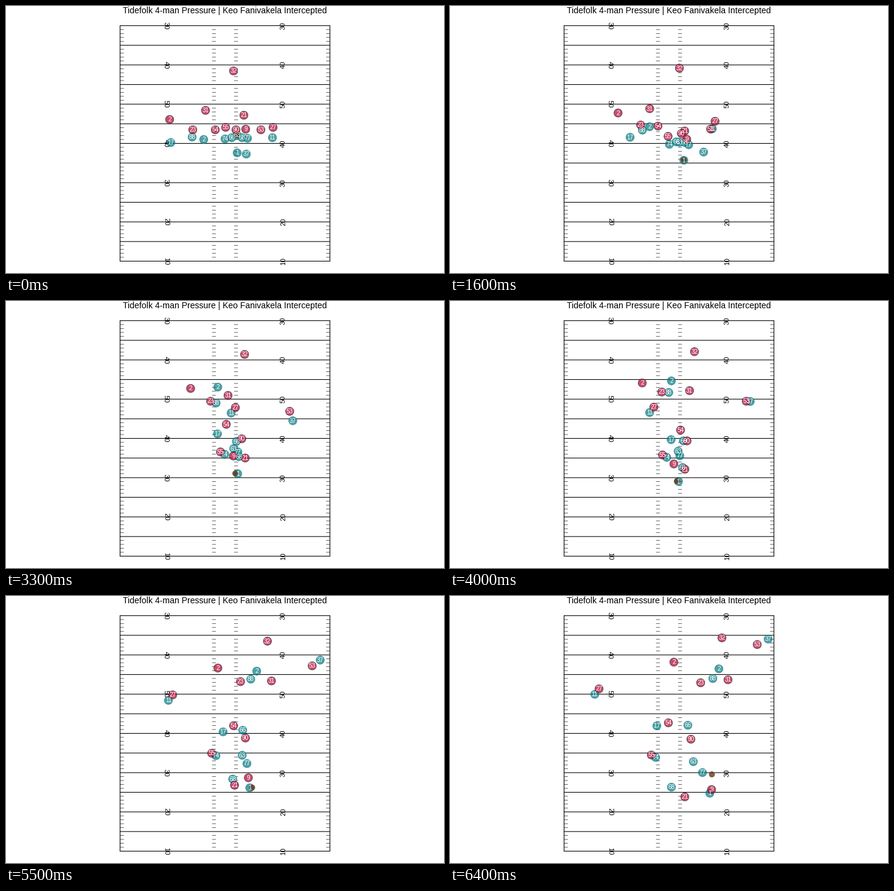
Write a matplotlib script that moves like this. It is 720 by 440 pixels and loops after 6.5 s.

```python
import numpy as np
import matplotlib.pyplot as plt
from matplotlib.animation import FuncAnimation
from matplotlib.patches import Circle

W, H, DPI = 720, 440, 100
FRAMES, STEP = 65, 100
PX = 72 / DPI                       # points per pixel
LEFT, RIGHT, TOP, BOTTOM = 187.5, 532.5, 32.4, 420.5
YARD = (BOTTOM - TOP) / 60
SNAP, CATCH, THROW, LAST = 5, 11, 60, FRAMES - 1
TIME = np.arange(FRAMES)

RED = dict(facecolor="#b80f34", edgecolor="#002244", alpha=0.75)
TEAL = dict(facecolor="#05787f", edgecolor="#05787f", alpha=0.7)
BROWN = dict(facecolor="#5f3014", edgecolor="#5f3014", alpha=0.76)

plt.rcParams["font.family"] = "Liberation Sans"
fig = plt.figure(figsize=(W / DPI, H / DPI), dpi=DPI, facecolor="white")
ax = fig.add_axes([0, 0, 1, 1])
ax.set_xlim(0, W)
ax.set_ylim(H, 0)
ax.axis("off")


def line(x0, y0, x1, y1, color="black", lw=1.07):
    ax.plot([x0, x1], [y0, y1], color=color, lw=lw * PX, snap=False,
            solid_capstyle="projecting" if lw > 1 else "butt", zorder=1)


def label(x, y, s, size, **kw):
    return ax.text(x, y, s, fontsize=size * PX, ha="center", va="baseline",
                   rotation_mode="anchor", **kw)


def draw_field():
    for yard in range(61):
        y = TOP + yard * YARD
        if yard % 5 == 0:
            line(LEFT, y, RIGHT, y)
            continue
        for x in (LEFT, LEFT + 23.367 * YARD):
            line(x, y, x + 6.3, y, "#444444", 0.83)
        for x in (LEFT + 29.967 * YARD, RIGHT):
            line(x - 6.3, y, x, y, "#444444", 0.83)
    for x in (LEFT, RIGHT):
        line(x, TOP, x, BOTTOM)
    for i in range(7):
        y = TOP + i * 10 * YARD
        mark = str(50 - 10 * abs(i - 2))
        label(260, y, mark, 11.4, rotation=270, zorder=2)
        label(459, y, mark, 11.4, rotation=90, zorder=2)
    label(359.7, 12, "Tidefolk 4-man Pressure | Keo Fanivakela Intercepted", 14)


def run(*points):
    """Smooth route through points evenly spaced in time, at rest until the snap."""
    p = np.array(points, float)
    slope = np.gradient(p, axis=0)
    slope[0] = 0
    t = np.clip((TIME - SNAP) / (LAST - SNAP), 0, 1) * (len(p) - 1)
    i = np.minimum(t.astype(int), len(p) - 2)
    u = (t - i)[:, None]
    v = 1 - u
    return (p[i] * (1 + 2 * u) * v ** 2 + slope[i] * u * v ** 2
            + p[i + 1] * u ** 2 * (3 - 2 * u) - slope[i + 1] * u ** 2 * v)


def cover(man, gap, final_gap, settled):
    """Follow another route while the gap changes from one offset to another."""
    u = np.clip((TIME - SNAP) / (settled - SNAP), 0, 1)[:, None]
    return man + (1 - u) * np.array(gap) + u * np.array(final_gap)


class Player:
    def __init__(self, team, number, route):
        self.route = route
        z = 4 if team is RED else 3
        self.dot = ax.add_patch(Circle((0, 0), 6.8, lw=0.75 * PX, zorder=z, **team))
        self.text = label(0, 0, str(number), 10, color="white", zorder=z + 4)

    def place(self, f):
        x, y = self.route[f]
        self.dot.center = x, y
        self.text.set_position((x, y + 3.3))


draw_field()

offense = {
    17: run((271, 225), (325, 211), (368, 231), (340, 214)),
    88: run((306, 216), (331, 188), (370, 143), (432, 136)),
    2: run((325, 220), (351, 139), (442, 120)),
    74: run((360, 219), (359, 254), (338, 266)),
    66: run((371, 217), (374, 230), (386, 229), (391, 213)),
    63: run((380, 213), (375, 237), (377, 251), (400, 273)),
    68: run((388, 217), (383, 238), (381, 284), (364, 315)),
    77: run((397, 218), (387, 241), (379, 260), (415, 291)),
    11: run((438, 217), (411, 188), (306, 182), (238, 162)),
    37: run((395, 244), (445, 227), (504, 147), (523, 71)),
    1: run((380, 242), (387, 270), (377, 304), (427, 325)),
}
defense = {
    32: run((374, 107), (394, 87), (447, 69)),
    31: run((328, 172), (338, 164), (409, 144), (457, 138)),
    21: run((391, 180), (385, 218), (393, 263), (373, 299), (386, 331)),
    2: run((269, 187), (306, 142), (368, 109)),
    54: run((344, 204), (345, 195), (384, 216), (359, 209)),
    90: run((378, 204), (388, 228), (396, 236)),
    9: run((394, 203), (383, 240), (370, 277), (430, 319)),
    53: run((419, 204), (444, 196), (496, 153), (505, 80)),
    23: cover(offense[88], (1, -12), (-20, 7), LAST),
    27: cover(offense[11], (1, -17), (7, -9), 24),
    55: cover(offense[74], (1, -19), (-7, -4), 33),
}
players = [Player(team, number, route)
           for team, squad in ((TEAL, offense), (RED, defense))
           for number, route in squad.items()]

ball = ax.add_patch(Circle((0, 0), 4.5, lw=0.7 * PX, zorder=5, **BROWN))
START, END = np.array([380.5, 212.5]), np.array([430.5, 294])


def in_hand(f):
    sway = -4 * np.sin(2 * np.pi * (max(f, 24) - 24) / 40)
    return offense[1][f] + (sway, -0.5)


def ball_at(f):
    if f < CATCH:
        u = max(0, f - SNAP) / (CATCH - SNAP)
        return START + u * (in_hand(CATCH) - START)
    if f <= THROW:
        return in_hand(f)
    u = (f - THROW) / (LAST - THROW)
    return in_hand(THROW) + u * (END - in_hand(THROW))


def update(f):
    for p in players:
        p.place(f)
    ball.center = tuple(ball_at(f))
    return []


anim = FuncAnimation(fig, update, frames=FRAMES, interval=STEP,
                     init_func=lambda: update(0), repeat=True, repeat_delay=0)
plt.show()
```
